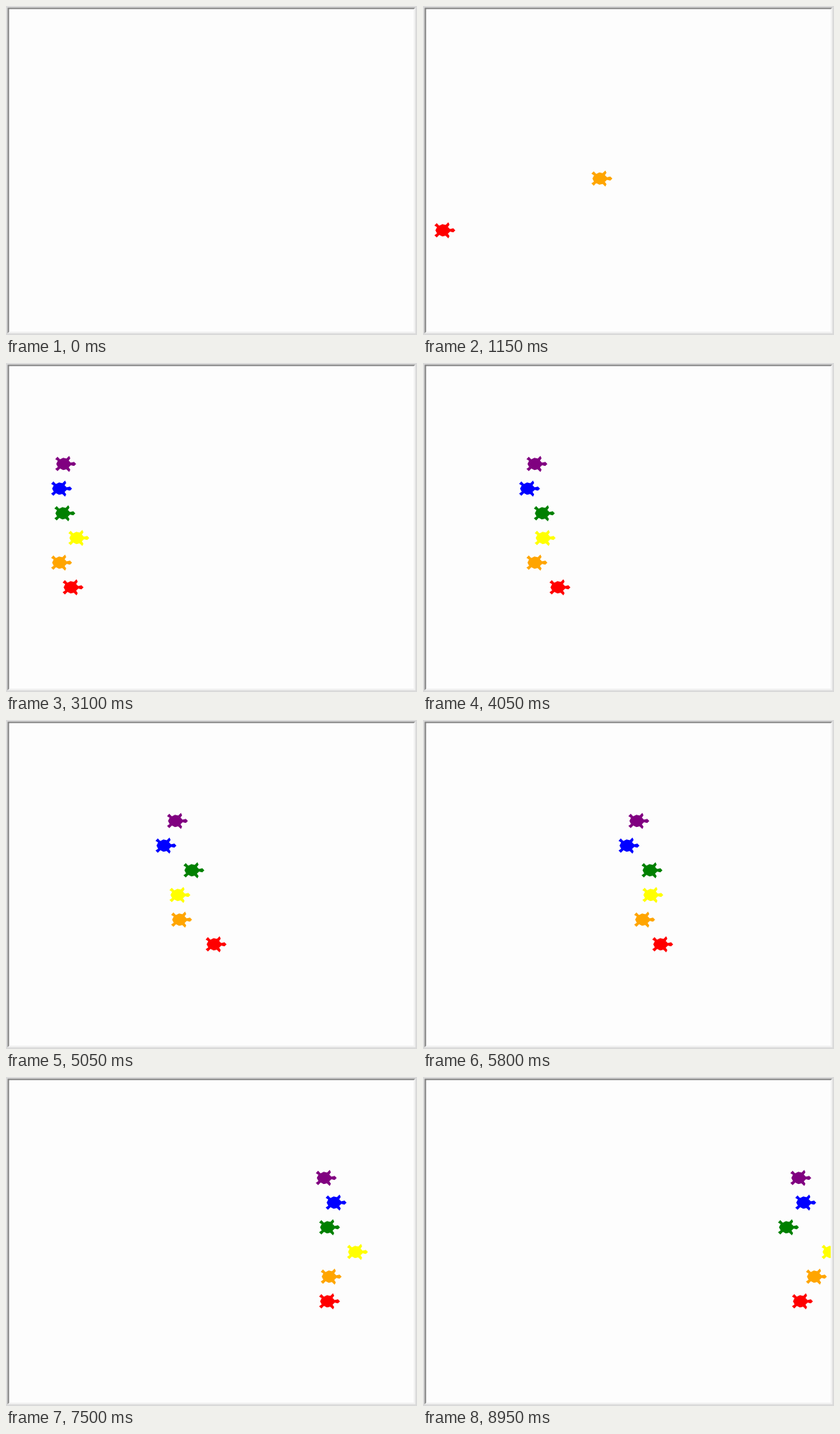
Recreate the animation shown at these times as an HTML page. Size 600x480 px, loop 9000 ms.

```html
<!DOCTYPE html>
<html lang="en">
<head>
<meta charset="utf-8">
<title>Turtle race</title>
<style>
html, body { margin: 0; width: 100%; height: 100%; overflow: hidden; background: #d9d9d9; }
svg { display: block; width: 600px; height: 480px; }
</style>
</head>
<body>
<svg viewBox="0 0 600 480">
  <defs>
    <clipPath id="field"><rect x="4.6" y="4.6" width="590.6" height="470.8"/></clipPath>
    <path id="turtle" stroke-width="1"/>
  </defs>
  <rect width="600" height="480" fill="#d9d9d9"/>
  <path d="M2.4 2.4H597.6L595.2 4.8H4.8V475.2L2.4 477.6Z" fill="#828282"/>
  <path d="M597.6 2.4V477.6H2.4L4.8 475.2H595.2V4.8Z" fill="#f2f2f2"/>
  <rect x="4.6" y="4.6" width="590.8" height="470.8" fill="#fdfdfd"/>
  <g clip-path="url(#field)"><g id="track" transform="translate(303.2 243.3) scale(1.2)"></g></g>
</svg>
<script>
const LOOP = 9000, STEP = 50;
const START_X = -230, LANE_Y = 70, LANE_GAP = 30;
const FIRST_WALK = 108, FIRST_READY = 1105, WALK = 267;

// Key moments of the race and the distance each turtle has run by then.
const keys = [2440, 3100, 5050, 6550, 7500, 8950];
const racers = [
  { color: 'red', run: [0, 55, 229, 301, 367, 435] },
  { color: 'orange', run: [0, 41, 187, 298, 369, 452] },
  { color: 'yellow', run: [0, 62, 185, 321, 401, 471] },
  { color: 'green', run: [0, 45, 202, 301, 367, 418] },
  { color: 'blue', run: [0, 41, 168, 279, 375, 439] },
  { color: 'purple', run: [0, 46, 182, 290, 363, 433] }
];

// Upper half of the outline, head to tail; the lower half mirrors it.
const half = [[16, 0], [14, -2], [10, -1], [7, -4], [9, -7], [8, -9], [5, -6], [1, -7],
  [-3, -5], [-6, -8], [-8, -6], [-5, -4], [-7, 0]];
const mirror = half.slice(1, -1).reverse().map(([x, y]) => [x, -y]);
document.getElementById('turtle').setAttribute('d', 'M' + half.concat(mirror).join('L') + 'Z');

const track = document.getElementById('track');
racers.forEach((r, i) => {
  r.y = LANE_Y - LANE_GAP * i;
  r.ready = FIRST_READY + WALK * i;
  r.start = i ? r.ready - WALK : FIRST_WALK;
  r.node = document.createElementNS('http://www.w3.org/2000/svg', 'use');
  r.node.setAttribute('href', '#turtle');
  r.node.setAttribute('fill', r.color);
  r.node.setAttribute('stroke', r.color);
  track.appendChild(r.node);
});

const progress = (t, a, b) => Math.max(0, Math.min(1, (t - a) / (b - a)));

function distance(run, t) {
  return run.slice(1).reduce((sum, d, i) =>
    sum + (d - run[i]) * progress(t, keys[i], keys[i + 1]), 0);
}

function draw(time) {
  const t = Math.floor((time % LOOP) / STEP) * STEP;
  for (const r of racers) {
    const walk = progress(t, r.start, r.ready);
    const x = Math.round(START_X * walk + distance(r.run, t));
    const y = Math.round(r.y * walk);
    r.node.setAttribute('visibility', t >= r.start ? 'visible' : 'hidden');
    r.node.setAttribute('transform', `translate(${x} ${y})`);
  }
}

let origin;
function tick(now) {
  origin ??= now;
  draw(now - origin);
  requestAnimationFrame(tick);
}
draw(0);
requestAnimationFrame(tick);
</script>
</body>
</html>
```
